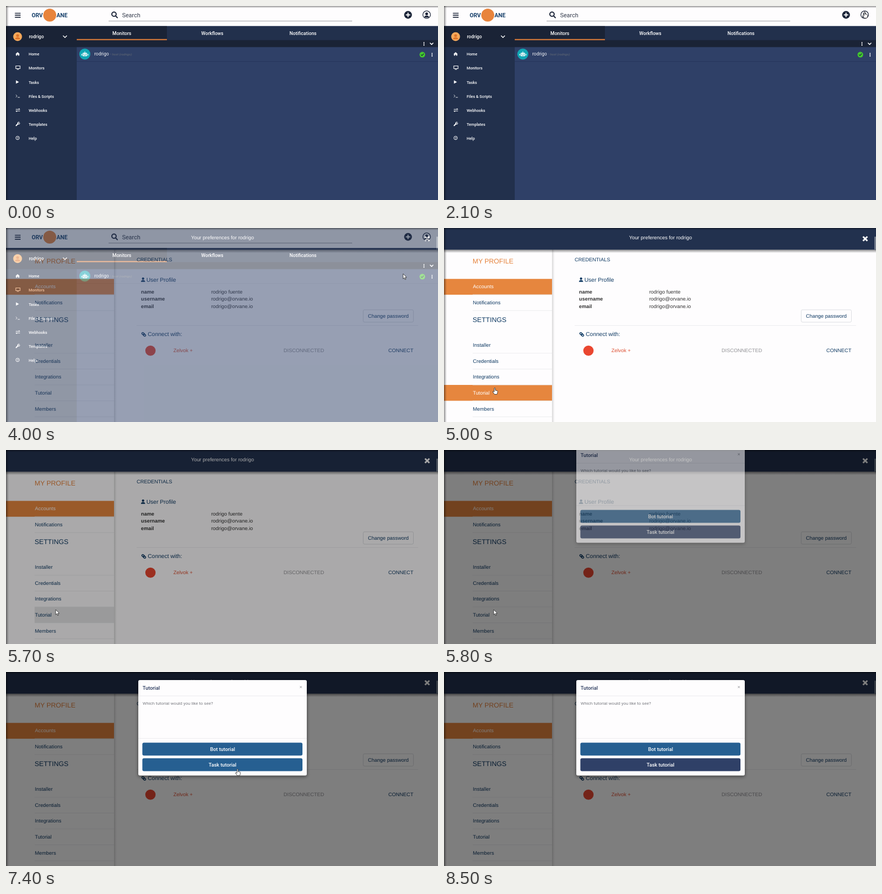
An HTML page for the animation above (8.6 s loop, 800 by 361 pixels).

```html
<!DOCTYPE html>
<html lang="en">
<head>
<meta charset="utf-8">
<title>Opening the tutorial</title>
<style>
  html, body { margin: 0; width: 100%; height: 100%; overflow: hidden; background: #fefdfe; }
  svg { display: block; width: 100%; height: 100%; }
  #main, #modal, #menu { font-family: Roboto, sans-serif; }
  #panel { font: 9.4px "Liberation Sans", Arial, sans-serif; fill: #0f3a63; text-rendering: geometricPrecision; }
  .side { font-size: 7.3px; font-weight: 500; fill: #fff; }
  .tab { font-size: 8.7px; font-weight: 500; fill: #fff; text-anchor: middle; }
  .line { fill: none; stroke-linecap: round; stroke-linejoin: round; }
  .rule { stroke: #e8e9eb; stroke-width: .8; }
  .mid { text-anchor: middle; }
  .big { font-size: 12.5px; }
  .head { font-size: 10.5px; }
  .value { fill: #333; }
  .button { fill: #fff; font-size: 9.3px; font-weight: 500; text-anchor: middle; }
</style>
</head>
<body>
<svg viewBox="0 0 800 361">
  <defs>
    <linearGradient id="down" x2="0" y2="1">
      <stop stop-color="#000" stop-opacity=".42"/><stop offset="1" stop-color="#000" stop-opacity="0"/>
    </linearGradient>
    <linearGradient id="right">
      <stop stop-color="#000" stop-opacity=".42"/><stop offset="1" stop-color="#000" stop-opacity="0"/>
    </linearGradient>
    <filter id="shadow" x="-10%" y="-10%" width="120%" height="125%">
      <feDropShadow dx="0" dy="2" stdDeviation="3" flood-opacity=".5"/>
    </filter>
    <g id="person"><circle cy="-2" r="2.6"/><path d="M-4.6 5Q-4.4 1.2 0 1.2T4.6 5Z"/></g>
    <g id="dots"><circle cy="-2.5" r="1"/><circle r="1"/><circle cy="2.5" r="1"/></g>
    <g id="chain" class="line" stroke="#0f3a63" stroke-width="1.5">
      <rect x="-4.2" y="-1.8" width="5" height="3.4" rx="1.7" transform="rotate(45)"/>
      <rect x="-.6" y="-1.8" width="5" height="3.4" rx="1.7" transform="rotate(45)"/>
    </g>
  </defs>

  <g id="main">
    <rect width="800" height="361" fill="#2f4067"/>
    <rect width="800" height="37.5" fill="#fefdfe"/>
    <path d="M16.5 13.5h10.500M16.5 17.2h10.500M16.5 20.9h10.500" stroke="#1b2438" stroke-width="1.7"/>
    <g font-size="10.5" font-weight="700" fill="#17406b">
      <text x="47.5" y="21">ORV</text><text x="93.5" y="21">ANE</text>
    </g>
    <circle cx="81" cy="17" r="12" fill="#e8843c"/>
    <g class="line" stroke="#1b2438" stroke-width="2"><circle cx="200" cy="15.2" r="4"/><path d="M203 18.5l3.200 3.200"/></g>
    <text x="215" y="20.5" font-size="11" fill="#333b4b">Search</text>
    <path d="M190 28H641" stroke="#8b8d94" stroke-width=".9"/>
    <circle cx="744.5" cy="16.5" r="7.2" fill="#1b2438"/>
    <path d="M740.5 16.5h8M744.5 12.5v8" stroke="#fff" stroke-width="2"/>
    <circle cx="779" cy="16.2" r="7" fill="#fff" stroke="#1b2438" stroke-width="1.3"/>
    <use href="#person" x="779" y="16.5" fill="#1b2438"/>

    <rect y="37.5" width="131" height="324" fill="#22304c"/>
    <rect y="37.5" width="131" height="39" fill="#1a2336"/>
    <circle cx="21.5" cy="57" r="8.2" fill="#f5a85a"/>
    <use href="#person" x="21.5" y="57" fill="#df7429"/>
    <text x="42.5" y="60" font-size="8.6" font-weight="500" fill="#fff">rodrigo</text>
    <path class="line" d="M106 55.5l3.200 3.200 3.200-3.200" stroke="#fff" stroke-width="1.4"/>
    <g id="side" class="side"></g>
    <g fill="#fff">
      <path d="M17.5 89.5L21.5 85.8l4 3.700h-1v3h-2v-2h-2v2h-2v-3z"/>
      <path d="M18.2 111.5h7.800v5H18.200zM20 118h4" fill="none" stroke="#fff" stroke-width="1.1"/>
      <path d="M18.5 138.2v6.400l5.500-3.200z"/>
      <path class="line" d="M18.5 165.5l2 2-2 2M22 170h3.200" stroke="#fff" stroke-width=".9"/>
      <path class="line" d="M18.5 192.3h7l-1.500-1.300M25.5 195.3h-7l1.500 1.300" stroke="#fff" stroke-width="1.1"/>
      <path class="line" d="M18.8 222.5l3.500-3.500" stroke="#fff" stroke-width="1.9"/>
      <path class="line" d="M24.5 216.5a1.800 1.800 0 1 0 .8 1.700" stroke="#fff" stroke-width="1.3"/>
      <circle cx="21.5" cy="245.5" r="3.2" fill="none" stroke="#fff"/>
      <text x="21.5" y="247.5" font-size="5.5" font-weight="700" class="mid">?</text>
    </g>

    <rect x="131" y="37.5" width="669" height="27" fill="#22304c"/>
    <rect x="131" y="37.5" width="167" height="27" fill="#1a2336"/>
    <rect x="131" y="63.5" width="669" height="13" fill="#1a2336"/>
    <rect x="131" y="61.5" width="167" height="2" fill="#e9823a"/>
    <g class="tab"><text x="214.5" y="53.5">Monitors</text><text x="382" y="53.5">Workflows</text><text x="550" y="53.5">Notifications</text></g>
    <use href="#dots" x="774" y="70.5" fill="#fff"/>
    <path class="line" d="M785.5 69l2.700 2.600 2.700-2.600" stroke="#fff" stroke-width="1.6"/>
    <path d="M131 103.3H800" stroke="#25345a"/>
    <circle cx="146" cy="89.5" r="10.2" fill="#11a7b5"/>
    <g fill="#fff">
      <rect x="142" y="87" width="8" height="6.5" rx="1.2"/>
      <path d="M145.5 84.5h1v3h-1zM139.7 89h1.300v3.300h-1.300zM151 89h1.300v3.300h-1.300z"/>
      <g fill="#11a7b5"><circle cx="144.2" cy="89.5" r=".9"/><circle cx="147.8" cy="89.5" r=".9"/><path d="M143.5 91.6h5v.8h-5z"/></g>
    </g>
    <text x="163.5" y="92.3" font-size="8.5" fill="#f2f3f6">rodrigo</text>
    <text x="193" y="92" font-size="6.2" font-style="italic" fill="#656b75">• host (rodrigo)</text>
    <circle cx="771" cy="90.5" r="5.2" fill="#43c92e"/>
    <path class="line" d="M768.7 90.7l1.600 1.600 3-3.300" stroke="#1a2f3c" stroke-width="1.2"/>
    <use href="#dots" x="789" y="90.8" fill="#fff"/>
  </g>

  <g id="menu">
    <rect x="691" y="33" width="104" height="87" fill="#fefdfe" filter="url(#shadow)"/>
    <rect x="691" y="33" width="104" height="43" fill="#f2f2f4"/>
    <rect id="choice" x="691" y="76" width="104" height="22" fill="#f2f2f4"/>
    <text x="704" y="46" font-size="9.4" font-weight="500" fill="#2a3447">rodrigo@orvane.io</text>
    <text x="704" y="66.5" font-size="6.2" fill="#777c86">rodrigo@orvane.io</text>
    <g font-size="8.5" fill="#2a3447"><text x="722" y="90.3">Settings</text><text x="722" y="112">Logout</text></g>
    <circle cx="707.5" cy="86.5" r="2.3" fill="none" stroke="#1b2438" stroke-width="2"/>
    <circle cx="707.5" cy="86.5" r="3.5" fill="none" stroke="#1b2438" stroke-width="1.2" stroke-dasharray="1.4 1.35"/>
    <path class="line" d="M706.5 106h-2v5h2M707 108.5h3.500M709 106.5l2 2-2 2" stroke="#1b2438" stroke-width="1.2"/>
  </g>

  <g id="panel">
    <rect width="800" height="361" fill="#fefdfe"/>
    <rect x="200" y="40" width="5" height="321" fill="url(#right)" opacity=".35"/>
    <rect width="800" height="40.5" fill="#22314e"/>
    <rect y="40.5" width="800" height="6" fill="url(#down)"/>
    <text x="401" y="21.2" class="mid" fill="#fff">Your preferences for rodrigo</text>
    <path d="M776 16l8 8M784 16l-8 8" stroke="#fff" stroke-width="3"/>
    <rect x="797" y="16" width="3" height="24" rx="1" fill="#77808f"/>
    <text x="53" y="66.3" class="big" fill="#e5823b">MY PROFILE</text>
    <text x="53" y="175" class="big">SETTINGS</text>
    <rect y="94.7" width="200" height="29.5" fill="#e6863e"/>
    <rect id="tutorial" y="292" height="29.5"/>
    <g id="links"></g>

    <text x="242" y="61.7">CREDENTIALS</text>
    <use href="#person" transform="translate(253.8 96) scale(.85)"/>
    <text x="260" y="99.5" class="head">User Profile</text>
    <g font-weight="700" class="value"><text x="250" y="121.5">name</text><text x="250" y="135">username</text><text x="250" y="148.5">email</text></g>
    <g class="value"><text x="380" y="121.5">rodrigo fuente</text><text x="380" y="135">rodrigo@orvane.io</text><text x="380" y="148.5">rodrigo@orvane.io</text></g>
    <rect x="661.5" y="152.2" width="93" height="23" rx="2.5" fill="none" stroke="#dcdee2"/>
    <text x="708" y="166.6" class="mid">Change password</text>
    <path d="M242 181.5H763" class="rule"/>
    <use href="#chain" x="255" y="198"/>
    <text x="262.5" y="201.3" class="head">Connect with:</text>
    <circle cx="267.5" cy="228.3" r="9.5" fill="#ea4630"/>
    <text x="310" y="231.3" fill="#dd4f32">Zelvok +</text>
    <text x="514" y="231.3" fill="#929296">DISCONNECTED</text>
    <text x="708" y="231.3">CONNECT</text>
  </g>

  <rect width="5" height="361" fill="url(#right)"/>
  <rect width="800" height="4" fill="url(#down)"/>
  <rect id="shade" width="800" height="361"/>

  <g id="modal">
    <rect x="245" y="15" width="312" height="177.5" rx="3" fill="#fefdfe" filter="url(#shadow)"/>
    <path d="M245 44.5H557M245 123.5H557" class="rule"/>
    <text x="253" y="32.5" font-size="9.3" font-weight="500" fill="#26365a">Tutorial</text>
    <text x="546" y="30.5" font-size="9.5" class="mid" fill="#a0a0a4">×</text>
    <text x="253" y="61" font-size="8.1" fill="#7a7c82">Which tutorial would you like to see?</text>
    <rect x="252.5" y="131.5" width="296.5" height="24" rx="3" fill="#265f91"/>
    <rect id="task" x="252.5" y="160.5" width="296.5" height="24" rx="3"/>
    <g class="button"><text x="401" y="146.5">Bot tutorial</text><text x="401" y="175.5">Task tutorial</text></g>
  </g>

  <g id="cursor" stroke="#222" stroke-width=".8" stroke-linejoin="round" fill="#fff">
    <path id="arrow" d="M0 0v9.500l2.200-2 1.500 3.500 1.500-.7-1.500-3.300h3z"/>
    <path id="hand" d="M-1 1Q0-.5 1 1v4l3.500.8q1 .3 .9 1.400l-.6 3.300-.8 2h-4.500l-3.200-4.500q-.2-1.500 1.200-1l1.500 1z"/>
  </g>
</svg>
<script>
const LOOP = 8600, STEP = 100;
const $ = id => document.getElementById(id);
const clamp = v => Math.max(0, Math.min(1, v));
const ramp = (t, from, to) => clamp((t - from) / (to - from));
const within = (t, from, to) => t >= from && t < to;
const show = (id, on) => $(id).style.display = on ? '' : 'none';
const fade = (id, v) => { show(id, v > 0); $(id).style.opacity = v; };
const set = (id, attrs) => Object.entries(attrs).forEach(([k, v]) => $(id).setAttribute(k, v));

$('side').innerHTML = ['Home', 'Monitors', 'Tasks', 'Files &amp; Scripts', 'Webhooks', 'Templates', 'Help']
  .map((s, i) => `<text x="42" y="${92.2 + i * 26.15}">${s}</text>`).join('');

const links = { Accounts: 109, Notifications: 138.7, Installer: 218, Credentials: 247.5, Integrations: 277, Tutorial: 306.6, Members: 336.3 };
$('links').innerHTML = Object.entries(links).map(([s, y]) =>
  `<path d="M53 ${y + 15}H200" class="rule"/><text id="link${s}" x="53.5" y="${y + 3.3}">${s}</text>`).join('');
$('linkAccounts').style.fill = '#fff';

// Pointer stops: time, x, y
const path = [
  [500, 440, 292], [700, 600, 216], [800, 600, 216], [1100, 710, 70], [1300, 710, 69],
  [2100, 779, 10], [2700, 779, 11], [3500, 736, 85], [4300, 735, 85], [4500, 361, 154],
  [4600, 361, 154], [5000, 94, 297], [5500, 94, 297], [5600, 92, 297], [5800, 92, 297],
  [6300, 451, 132], [6600, 451, 132], [7000, 430, 165], [7100, 430, 165], [8000, 425, 224]
];
const handTimes = [[1900, 2800], [3300, 4000], [4900, 5600], [6200, 7500]];

function pointer(t) {
  const i = path.findIndex(p => p[0] > t);
  if (i < 1) return path[i < 0 ? path.length - 1 : 0].slice(1);
  const [a, b] = [path[i - 1], path[i]];
  const k = ramp(t, a[0], b[0]), e = k * k * (3 - 2 * k);
  return [a[1] + (b[1] - a[1]) * e, a[2] + (b[2] - a[2]) * e];
}

function draw(now) {
  const t = Math.floor(now % LOOP / STEP) * STEP;
  const [x, y] = pointer(t);

  show('main', t < 4200);
  fade('menu', t < 3900 ? ramp(t, 2400, 2600) : 0);
  show('choice', y > 76);
  fade('panel', ramp(t, 3800, 4200));

  const hover = within(t, 4900, 5600), focus = within(t, 5600, 5800);
  show('tutorial', hover || focus);
  set('tutorial', focus ? { x: 53, width: 147, fill: '#e6e6e8' } : { x: 0, width: 200, fill: '#e6863e' });
  $('linkTutorial').style.fill = hover ? '#fff' : '';

  fade('shade', .5 * ramp(t, 5500, 5800));
  const open = 1 - (1 - ramp(t, 5700, 6000)) ** 2;
  fade('modal', open);
  set('modal', { transform: `translate(0 ${-45 * (1 - open)})` });
  set('task', { fill: t > 6600 && within(y, 160, 185) ? '#265f91' : '#2f4067' });

  const hand = handTimes.some(([from, to]) => within(t, from, to));
  show('cursor', within(t, 500, 8100));
  show('hand', hand);
  show('arrow', !hand);
  set('cursor', { transform: `translate(${x} ${y})` });
}

let start;
function tick(now) {
  start ??= now;
  draw(now - start);
  requestAnimationFrame(tick);
}
draw(0);
requestAnimationFrame(tick);
</script>
</body>
</html>
```
